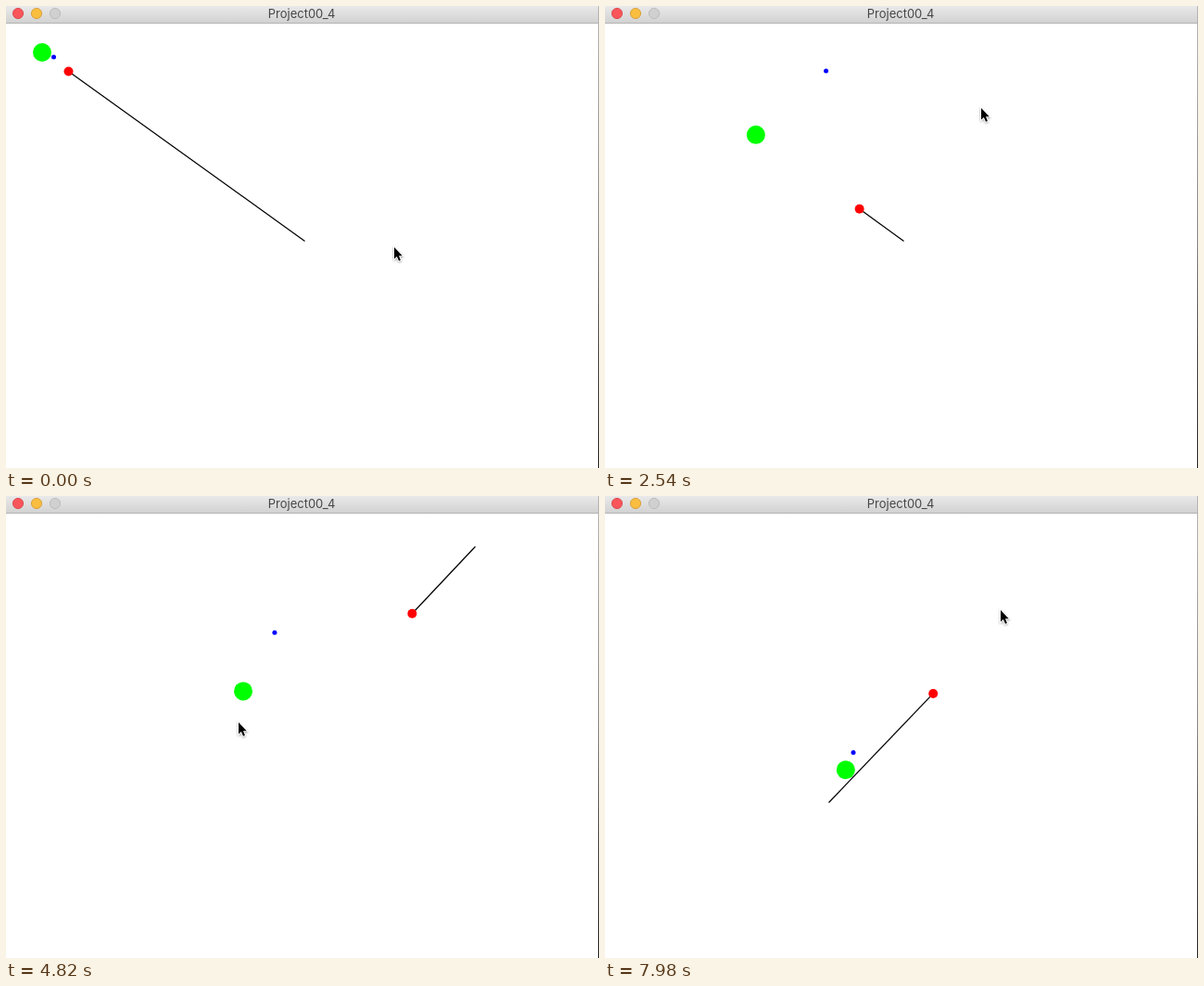
These frames come from a looping animation (640x498 px, 8000 ms). An HTML page:

```html
<!DOCTYPE html>
<html lang="en">
<head>
<meta charset="utf-8">
<title>Project00_4</title>
<style>
  html, body { margin: 0; width: 100%; height: 100%; overflow: hidden; background: #fff; }
  svg { display: block; width: 100%; height: 100%; }
  text { font: 13px Inter, sans-serif; fill: #464646; text-anchor: middle; }
</style>
</head>
<body>
<svg viewBox="0 0 640 498">
  <defs>
    <linearGradient id="bar" x2="0" y2="1">
      <stop stop-color="#e9e9e9"/><stop offset="1" stop-color="#d2d2d2"/>
    </linearGradient>
    <linearGradient id="edge" x2="0" y2="1">
      <stop stop-color="#b4b4b4"/><stop offset=".5" stop-color="#858585"/>
      <stop offset=".75" stop-color="#444"/><stop offset="1" stop-color="#222"/>
    </linearGradient>
    <filter id="shadow" x="-50%" y="-50%" width="200%" height="200%">
      <feDropShadow dx="0" dy="1" stdDeviation=".8" flood-opacity=".4"/>
    </filter>
  </defs>
  <rect width="640" height="498" fill="#fff"/>
  <rect width="640" height="18" fill="url(#bar)"/>
  <rect y="18" width="640" height="1" fill="#b3b3b3"/>
  <rect x="639" width="1" height="498" fill="url(#edge)"/>
  <circle cx="13" cy="8" r="5.6" fill="#f9555b" stroke="#d8444a" stroke-width=".9"/>
  <circle cx="33" cy="8" r="5.6" fill="#f9bd40" stroke="#d99e36" stroke-width=".9"/>
  <circle cx="53" cy="8" r="5.6" fill="#d0d0d0" stroke="#b9b9b9" stroke-width=".9"/>
  <text x="319" y="13">Project00_4</text>
  <line id="path" stroke="#000" stroke-width="1.25"/>
  <circle id="green" r="10" fill="#0f0"/>
  <circle id="red" r="5" fill="#f00"/>
  <circle id="blue" r="2.5" fill="#00f"/>
  <path id="cursor" d="M0 0V12.6L2.9 10 5 14.7 6.9 13.9 5 9.3H8.8Z"
    stroke="#fff" stroke-width="1.6" paint-order="stroke" filter="url(#shadow)"/>
</svg>
<script>
const LOOP = 8000, STEP = 20;

// Each dot walks through its turning points at a constant speed in px/ms
const walkers = {
  red: { speed: 0.1003, route: [[67.5, 70.5], [321, 252], [505.5, 55], [241.5, 330.5]] },
  green: { speed: 0.06, route: [
    [39, 50], [191, 159], [234.5, 173.5], [257.5, 177.5],
    [256, 210.5], [247, 280], [220.5, 336.5], [260, 295]
  ] },
  blue: { speed: 0.075, route: [
    [51.5, 55], [100, 73], [176, 74.5], [238, 70], [323, 68.3],
    [321.7, 84.5], [290, 147], [264.5, 232], [230, 317.7], [268, 276.5]
  ] }
};
// The red dot turns just short of each goal
const goals = [[322.5, 253.5], [506.5, 54.5], [241.5, 330.5]];

// Pointer poses: [ms, x, y]
const pointer = [
  [0, 419, 260], [1100, 330, 90], [1700, 315, 69], [2100, 350, 60], [2540, 406, 110],
  [3110, 507, 54], [3880, 286, 177], [4820, 251, 244], [5790, 241, 328],
  [6000, 213, 346], [7050, 213, 352], [7980, 427, 123]
];

const set = (id, attrs) => {
  const node = document.getElementById(id);
  for (const key in attrs) node.setAttribute(key, attrs[key]);
};

function walk({ route, speed }, t) {
  let left = speed * t;
  for (let leg = 0; ; leg++) {
    const [x, y] = route[leg], [x2, y2] = route[leg + 1];
    const length = Math.hypot(x2 - x, y2 - y);
    if (left < length || leg === route.length - 2) {
      const u = Math.min(left / length, 1);
      return { x: x + (x2 - x) * u, y: y + (y2 - y) * u, leg };
    }
    left -= length;
  }
}

// Smooth curve through timed points
function glide(keys, t) {
  let i = 0;
  while (i < keys.length - 2 && keys[i + 1][0] <= t) i++;
  const a = keys[i], b = keys[i + 1];
  const before = keys[i - 1] || a, after = keys[i + 2] || b;
  const span = b[0] - a[0], u = (t - a[0]) / span, v = 1 - u;
  return [1, 2].map(k => {
    const m = (b[k] - before[k]) / (b[0] - before[0]) * span;
    const n = (after[k] - a[k]) / (after[0] - a[0]) * span;
    return v * v * (1 + 2 * u) * a[k] + u * u * (3 - 2 * u) * b[k] + u * v * (v * m - u * n);
  });
}

function draw(t) {
  for (const id in walkers) {
    const { x, y, leg } = walk(walkers[id], t);
    set(id, { cx: x, cy: y });
    if (id === "red") set("path", { x1: x, y1: y, x2: goals[leg][0], y2: goals[leg][1] });
  }
  set("cursor", { transform: `translate(${glide(pointer, t)})` });
}

const start = performance.now();
function frame() {
  const t = (performance.now() - start) % LOOP;
  draw(Math.floor(t / STEP) * STEP);
  requestAnimationFrame(frame);
}
frame();
</script>
</body>
</html>
```
